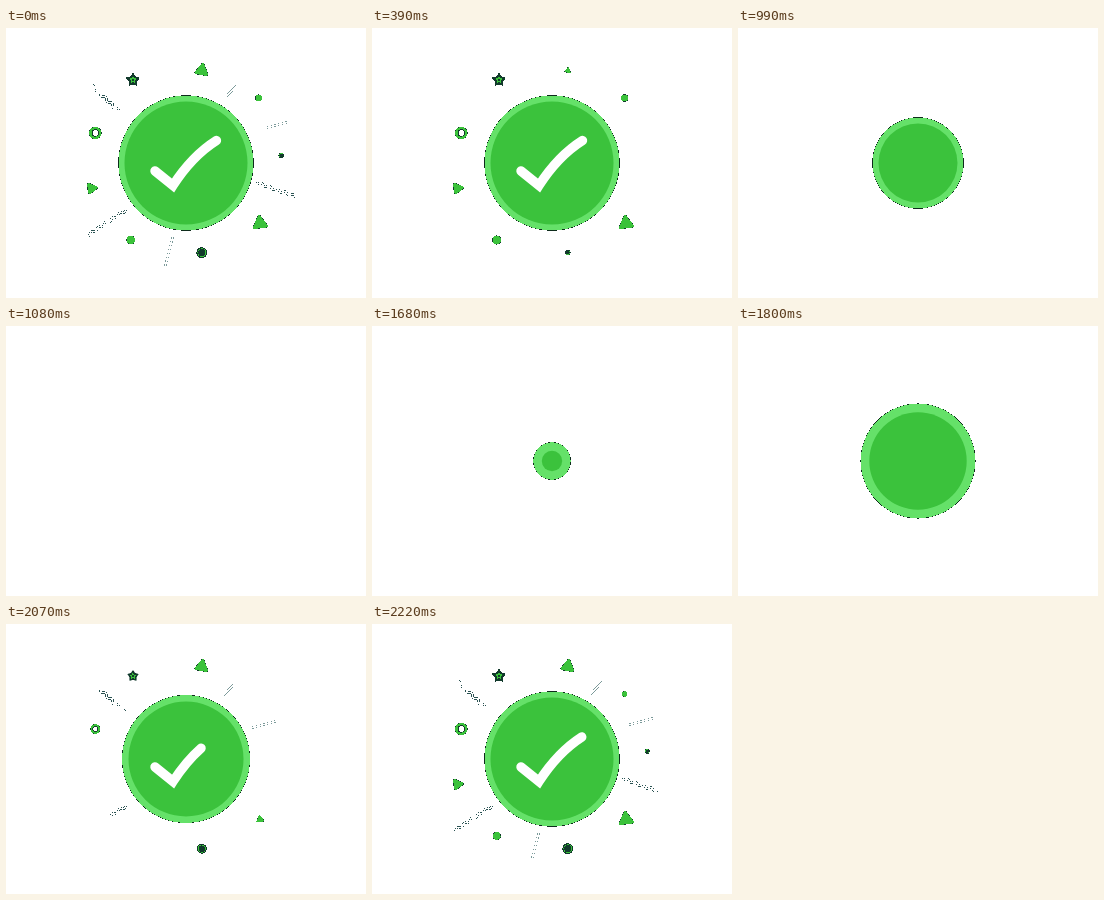
An HTML page for the animation above (2.25 s loop, 360x270 px).

```html
<!DOCTYPE html>
<html lang="en">
<head>
<meta charset="utf-8">
<title>Success check</title>
<style>
  html, body { margin: 0; width: 100%; height: 100%; overflow: hidden; background: #fff; }
  svg { display: block; width: 100%; height: 100%; }
  .crisp { shape-rendering: crispEdges; }
  .streak { fill: none; stroke-linejoin: round; }
  .leaf { fill: #3bc23b; stroke: #3bc23b; }
  .dark { fill: #123a2c; stroke: #123a2c; }
  .hole { fill: #fff; stroke: #fff; }
  #confetti { stroke-linejoin: round; }
</style>
</head>
<body>
<svg viewBox="0 0 360 270">
  <g id="streaks" class="crisp"></g>
  <circle id="edge" class="crisp" cx="180" cy="135" fill="#0e2c1c"/>
  <circle id="rim" class="crisp" cx="180" cy="135" fill="#65e169"/>
  <circle id="disc" cx="180" cy="135" fill="#3bc23c"/>
  <path id="tick" d="M149 143L167 157.5Q186 128 210.5 112.5" pathLength="1" fill="none"
        stroke="#fff" stroke-width="9.4" stroke-linecap="round"/>
  <g id="confetti" class="crisp"></g>
</svg>
<script>
// The loop opens mid-burst, so times before REST belong to the end of the cycle.
const LOOP = 2250, STEP = 30, REST = 1200;
const $ = id => document.getElementById(id);

const ramp = (t, start, length) => Math.min(1, Math.max(0, (t - start) / length));
const easeIn = p => p * p;
const easeOut = p => 1 - (1 - p) ** 2;

function add(parent, tag, attrs) {
  const el = document.createElementNS('http://www.w3.org/2000/svg', tag);
  for (const key in attrs) el.setAttribute(key, attrs[key]);
  return parent.appendChild(el);
}

function show(el, visible) {
  el.style.display = visible ? '' : 'none';
}

// Shows only the part of a path between two fractions of its length.
function trim(el, tail, head) {
  const length = Math.max(head - tail, 0);
  show(el, length > .001);
  el.setAttribute('stroke-dasharray', `${length} 3`);
  el.setAttribute('stroke-dashoffset', -tail);
}

function linePath([x1, y1], [x2, y2], wave) {
  const dx = x2 - x1, dy = y2 - y1, length = Math.hypot(dx, dy);
  const count = Math.round(length);
  const points = Array.from({ length: count + 1 }, (_, i) => {
    const k = i / count, off = wave * Math.sin(k * length * Math.PI * 2 / 8.5) / length;
    return `${(x1 + dx * k - dy * off).toFixed(2)} ${(y1 + dy * k + dx * off).toFixed(2)}`;
  });
  return 'M' + points.join('L');
}

// Each streak shoots out at `start`; its near end follows from `leave` on.
const streaks = [
  { from: [119, 89], to: [84, 56], wave: 1.3, start: 1960, leave: 2130 },
  { from: [123, 180], to: [82, 207], wave: 1.1, start: 2010, leave: 2200 },
  { from: [249, 154], to: [294, 170], wave: 1.2, start: 2085, leave: 2220 },
  { from: [215, 74], to: [233, 55], wave: 0, start: 1960, leave: 2090 },
  { from: [245, 104], to: [282, 94], wave: 0, start: 1970, leave: 2060 },
  { from: [167, 208], to: [158.5, 241], wave: 0, start: 2085, leave: 2200 }
];
for (const s of streaks) {
  const d = linePath(s.from, s.to, s.wave);
  const stroke = (color, width) => add($('streaks'), 'path',
    { d, pathLength: 1, class: 'streak', stroke: color, 'stroke-width': width });
  s.layers = [stroke(s.wave ? '#2a5252' : '#7c9a9a', 2.3), stroke('#fff', 1.6)];
}

// Regular polygon, or a star when `inner` is below 1.
function polygon(sides, radius, turn, inner = 0) {
  const count = inner ? sides * 2 : sides;
  return Array.from({ length: count }, (_, i) => {
    const r = inner && i % 2 ? radius * inner : radius;
    const a = turn + i * Math.PI * 2 / count;
    return `${(r * Math.cos(a)).toFixed(2)},${(r * Math.sin(a)).toFixed(2)}`;
  }).join(' ');
}
const disc = (r, cls) => ['circle', { r, class: cls, 'stroke-width': 0 }];
const poly = (points, cls, width) => ['polygon', { points, class: cls, 'stroke-width': width }];
const dot = r => [disc(r + .3, 'dark'), disc(r, 'leaf')];
const triangle = (r, turn) => {
  const points = polygon(3, r, turn);
  return [poly(points, 'dark', 3.6), poly(points, 'leaf', 3)];
};
const star = r => [
  poly(polygon(5, r, -Math.PI / 2, .62), 'dark', 1),
  poly(polygon(5, r * .65, -Math.PI / 2, .5), 'leaf', 0),
  disc(r * .22, 'dark')
];
const ring = r => [...dot(r), disc(r * .6, 'dark'), disc(r * .46, 'hole')];
const eye = r => [disc(r, 'dark'), disc(r * .8, 'leaf'), disc(r * .66, 'dark')];

const GONE = 2640;
const confetti = [
  { at: [127, 52], parts: star(6.6), enter: 1995 },
  { at: [89.3, 105], parts: ring(6.1), enter: 2000 },
  { at: [195.8, 42.5], parts: triangle(6, -1.4), enter: 1950, leave: 2530 },
  { at: [252.7, 70], parts: dot(3.5), enter: 2155, leave: 2670 },
  { at: [275.2, 127.3], parts: eye(2.8), enter: 2130, leave: 2460 },
  { at: [85.5, 160.3], parts: triangle(4.6, -.1), enter: 2100 },
  { at: [124.8, 212], parts: dot(4.3), enter: 2135 },
  { at: [195.8, 224.7], parts: eye(5.5), enter: 1980, leave: 2535 },
  { at: [254, 195.3], parts: triangle(6.8, -1.7), enter: 2030 }
];
for (const c of confetti) {
  c.group = add($('confetti'), 'g', {});
  for (const [tag, attrs] of c.parts) add(c.group, tag, attrs);
}

function drawBadge(t) {
  const settle = ramp(t, 1830, 390);
  const collapse = 1 - easeIn(ramp(t, 3120, 210));
  const radius = (58 * easeOut(ramp(t, 1650, 170)) + 9.4 * settle) * collapse;
  const rimWidth = 8.5 - 2.6 * easeOut(settle);
  $('edge').setAttribute('r', radius + .35);
  show($('edge'), radius > 0);
  $('rim').setAttribute('r', radius);
  $('disc').setAttribute('r', Math.max(radius - rimWidth, 0));
  trim($('tick'), easeIn(ramp(t, 2990, 190)), easeOut(ramp(t, 1860, 400)));
}

function draw(now) {
  const phase = Math.floor((now % LOOP) / STEP) * STEP;
  const t = phase < REST ? phase + LOOP : phase;
  drawBadge(t);
  for (const { layers, start, leave } of streaks) {
    const head = easeOut(ramp(t, start, 240)), tail = easeIn(ramp(t, leave, 300));
    for (const layer of layers) trim(layer, tail, head);
  }
  for (const { group, at, enter, leave = GONE } of confetti) {
    const size = easeOut(ramp(t, enter, 130)) * (1 - easeIn(ramp(t, leave, 150)));
    show(group, size > 0);
    group.setAttribute('transform', `translate(${at}) scale(${size})`);
  }
}

let origin;
function frame(now) {
  origin ??= now;
  draw(now - origin);
  requestAnimationFrame(frame);
}
draw(0);
requestAnimationFrame(frame);
</script>
</body>
</html>
```
